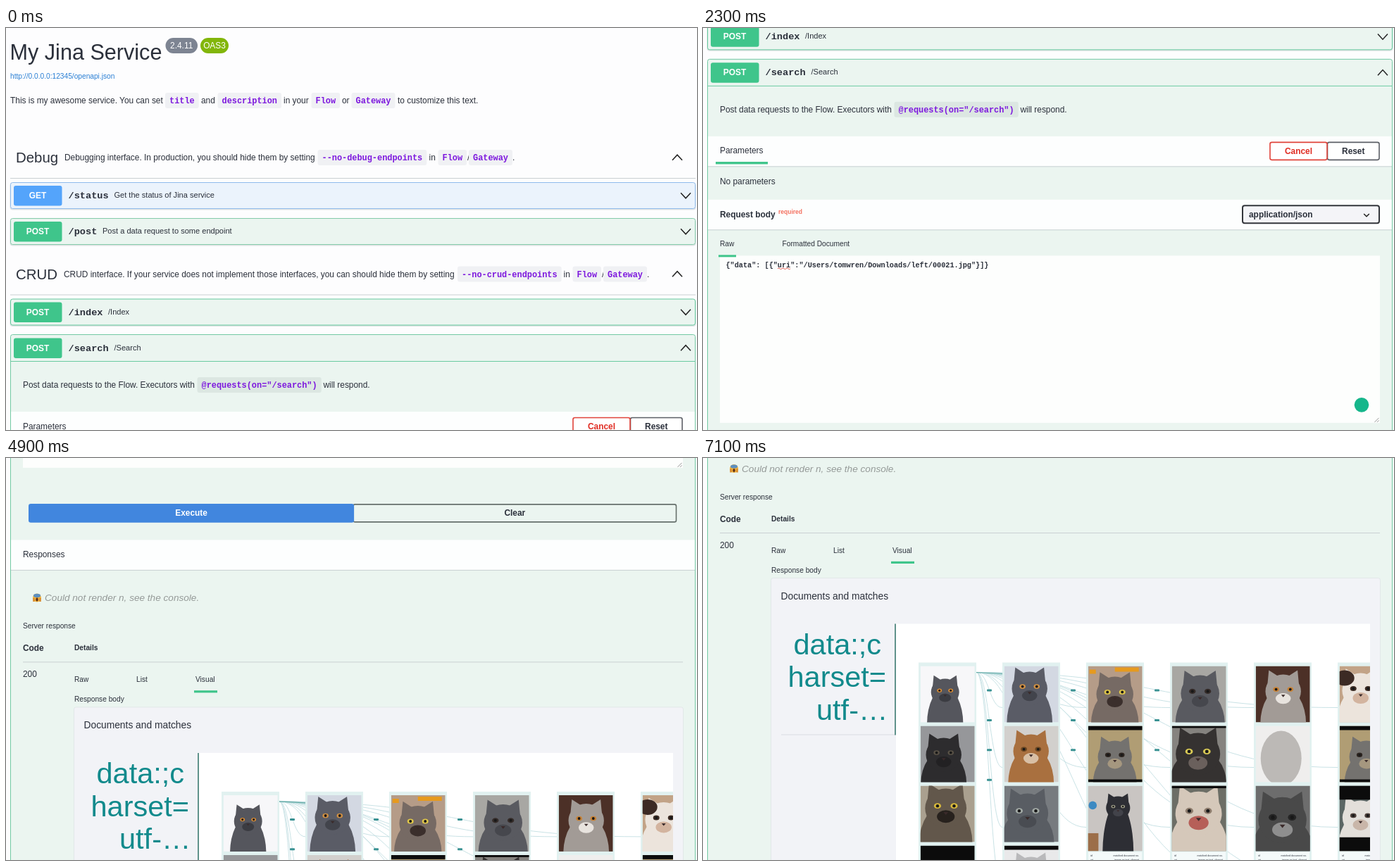
Write an HTML page that moves like this. It is 981x571 px and loops after 7200 ms.

```html
<!DOCTYPE html>
<html lang="en">
<head>
<meta charset="utf-8">
<title>API docs scroll</title>
<style>
  html, body { margin: 0; width: 100%; height: 100%; overflow: hidden; background: #fdfdfe; }
  svg { display: block; }
  #stage { width: 100%; height: 100%; }
  text { font-family: "Liberation Sans", Arial, sans-serif; fill: #2b303b; }
  .b { font-weight: bold; }
  .m { font-family: "Liberation Mono", monospace; font-weight: bold; }
  .c { text-anchor: middle; }
  .e { text-anchor: end; }
  .code { fill: #7d18de; }
  .w { fill: #fff; }
  .link { fill: #2a7fd4; }
  .cancel { fill: #e02c22; }
  .required { fill: #f4705f; }
  .notice { fill: #959a98; font-style: italic; }
  .big { fill: #128a8c; }
</style>
</head>
<body>
<svg id="stage" viewBox="0 0 981 571"><g id="page"></g></svg>
<script>
const GREEN = '#3fc58b', LINE = '#c9d0d2', MINT = '#ebf5f0';
const out = [];
const add = markup => out.push(markup);

const text = (x, y, str, size = 11.9, cls = '') =>
  add(`<text x="${x}" y="${y}" font-size="${size}" class="${cls}">${str}</text>`);
const rect = (x, y, w, h, fill, attrs = '') =>
  add(`<rect x="${x}" y="${y}" width="${w}" height="${h}" fill="${fill}" ${attrs}/>`);
const path = (d, stroke, width = 1) =>
  add(`<path d="${d}" fill="none" stroke="${stroke}" stroke-width="${width}"/>`);
const hline = (x1, x2, y, color = LINE) => path(`M${x1} ${y}H${x2}`, color);
const chevron = (x, y, dy, half = 7) =>
  path(`M${x - half} ${y - dy}L${x} ${y + dy}L${x + half} ${y - dy}`, '#222', 1.5);

function code(x, y, str, fill = '#f0f1f4') {
  rect(x, y - 15, str.length * 7.14 + 12, 22, fill, 'rx="3"');
  text(x + 6, y, str, 11.9, 'm code');
}

function section(y, name, descX, desc, flag, flagX, tailX) {
  text(14, y + 7, name, 20.4);
  text(descX, y + 4, desc);
  code(flagX, y + 4, flag);
  text(tailX, y + 4, 'in');
  code(tailX + 13, y + 4, 'Flow');
  text(tailX + 54.5, y + 4, '/');
  code(tailX + 56.5, y + 4, 'Gateway');
  text(tailX + 118.5, y + 4, '.');
  chevron(953, y, -3.8);
  hline(6, 979, y + 29.5);
}

function operation(y, method, route, descX, desc, color, fill, border) {
  if (fill) {
    rect(6.5, y + 1.5, 972, 37, 'none', 'rx="3" stroke="#dfe3e4" stroke-width="2"');
    rect(6.5, y + .5, 972, 37, fill, `rx="3" stroke="${border}"`);
  }
  rect(11, y + 5, 68.5, 28.5, color, 'rx="3"');
  text(45, y + 23, method, 11.9, 'b w c');
  text(88.5, y + 23, route, 13.6, 'm');
  text(descX, y + 22, desc, 11.05);
  chevron(965, y + 19, fill ? 3.8 : -3.8);
}

function band(y) {
  rect(7, y, 971, 42.5, '#fdfefe');
  hline(7, 978, y + 43);
}

function button(x, y, w, label, fill, stroke, cls = '') {
  rect(x, y, w, 25, fill, `rx="2.5" stroke="${stroke}" stroke-width="1.6"`);
  text(x + w / 2, y + 16.6, label, 11.9, 'b c ' + cls);
}

// Header
text(5.5, 45, 'My Jina Service', 30.6);
rect(226.5, 14, 45.5, 22, '#7d8492', 'rx="11"');
text(249.2, 29, '2.4.11', 11.9, 'w c');
rect(276, 14, 40, 22, '#82b60a', 'rx="11"');
text(296, 29, 'OAS3', 11.9, 'w c');
text(6, 72, 'http://0.0.0.0:12345/openapi.json', 10.2, 'link');
text(6, 107, 'This is my awesome service. You can set');
code(226, 107, 'title');
text(277, 107, 'and');
code(300.5, 107, 'description');
text(394, 107, 'in your');
code(433.5, 107, 'Flow');
text(477, 107, 'or');
code(490.5, 107, 'Gateway');
text(556, 107, 'to customize this text.');

// Operations
section(184, 'Debug', 83, 'Debugging interface. In production, you should hide them by setting',
  '--no-debug-endpoints', 442.5, 600.5);
operation(219, 'GET', '/status', 153.5, 'Get the status of Jina service', '#54a4fb', '#ebf3fc', '#8fbbec');
operation(270, 'POST', '/post', 137, 'Post a data request to some endpoint', GREEN, MINT, '#83cbaa');
section(349.5, 'CRUD', 82, 'CRUD interface. If your service does not implement those interfaces, you can should hide them by setting',
  '--no-crud-endpoints', 641, 791.5);
operation(384.5, 'POST', '/index', 145, '/Index', GREEN, MINT, '#62c99c');
rect(6.5, 435.5, 972, 1500, MINT, 'rx="3" stroke="#72c9a3"');
operation(435.5, 'POST', '/search', 153.5, '/Search', GREEN);
hline(7, 978, 473.5, '#6acba1');

// Request
text(24, 511, 'Post data requests to the Flow. Executors with');
code(271.5, 511, '@requests(on="/search")', '#dce7e2');
text(450.5, 511, 'will respond.');
band(545);
text(24, 569.5, 'Parameters');
rect(18, 581.2, 74, 3.4, GREEN);
button(886.5, 553.5, 73.5, 'Reset', '#fff', '#5c5f66');
button(805, 553.5, 81, 'Cancel', '#fff', '#e0433a', 'cancel');
text(24, 613, 'No parameters');
band(635);
text(24, 660, 'Request body', 11.9, 'b');
text(107, 655, 'required', 8.5, 'b required');
rect(766, 643.5, 194, 25, '#f4f4f8', 'rx="3" stroke="#34363c" stroke-width="2"');
text(775, 660, 'application/json', 11.9, 'b');
chevron(942, 657, 1.9, 3.8);
text(24, 701, 'Raw', 10.2);
text(112.5, 701, 'Formatted Document', 10.2);
rect(24, 714.5, 937, 237.5, '#fdfefd');
rect(22, 713.5, 25, 3, GREEN);
text(32.5, 731.3, '{"data": [{"uri":"/Users/tomwren/Downloads/left/00021.jpg"}]}', 10.2, 'm');
path('M106 733' + 'q1.5 -1.6 3 0t3 0'.repeat(3), '#e05a50');
add('<circle cx="935" cy="926.5" r="10.3" fill="#16b68b"/>');
path('M953.5 951L959.5 945M957 951L959.5 948.5', '#888', .9);
button(493, 1004, 458.5, 'Clear', MINT, '#66706c');
button(32.8, 1004, 460.5, 'Execute', '#4186de', '#4186de', 'w');

// Response
band(1054.5);
text(24, 1079, 'Responses');
add(`<circle cx="44" cy="1136.5" r="6" fill="#f0b23c"/>
  <ellipse cx="44" cy="1133.5" rx="5" ry="2.6" fill="#5c8fc0"/>
  <ellipse cx="44" cy="1139" rx="1.7" ry="2.6" fill="#5a2f1c"/>`);
path('M39.5 1137v5M48.5 1137v5', '#d9892b', 2.5);
text(55, 1141.5, 'Could not render n, see the console.', 13.6, 'notice');
text(24, 1180.5, 'Server response', 10.2);
text(24, 1212, 'Code', 11.9, 'b');
text(97, 1211.3, 'Details', 10.2, 'b');
hline(24, 961, 1228);
text(24, 1249.5, '200');
text(97, 1256.3, 'Raw', 10.2);
text(185, 1256.3, 'List', 10.2);
text(269, 1256.3, 'Visual', 10.2);
rect(267, 1268.3, 33, 3.2, GREEN);
text(97, 1284.5, 'Response body', 10.2);
rect(96.5, 1292, 865, 700, '#f2f3f7', 'rx="3" stroke="#e2e8e8"');
text(110.5, 1322.5, 'Documents and matches', 13.8);
text(128.5, 1400, 'data:;c', 41.5, 'big');
text(120.5, 1446.7, 'harset=', 41.5, 'big');
text(161, 1493.4, 'utf-…', 41.5, 'big');
hline(111, 273, 1514.5, '#d9dce2');
rect(274, 1357, 673, 600, '#fff');
path('M273 1357V1515', '#3c7a70', 1.6);

// Photo wall: each picture is a simple cat in the main tones
function cat(bg, fur, patch, eye, cx, cy, r, extra = '') {
  const side = s => `<path d="M${cx + s * r * .95} ${cy - r * .2}L${cx + s * r * .85} ${cy - r * 1.25}L${cx + s * r * .15} ${cy - r * .8}" fill="${fur}"/>`;
  const eyeball = s => `<ellipse cx="${cx + s * r * .42}" cy="${cy - r * .12}" rx="${r * .18}" ry="${r * .14}" fill="${eye}"/>
    <circle cx="${cx + s * r * .42}" cy="${cy - r * .12}" r="${r * .08}" fill="#181818"/>`;
  return `<rect width="77" height="80" fill="${bg}"/>
    <ellipse cx="${cx}" cy="82" rx="${r * 1.35}" ry="${88 - cy}" fill="${fur}"/>
    ${side(-1)}${side(1)}<ellipse cx="${cx}" cy="${cy}" rx="${r * 1.05}" ry="${r}" fill="${fur}"/>
    <ellipse cx="${cx}" cy="${cy + r * .42}" rx="${r * .45}" ry="${r * .32}" fill="${patch}"/>
    <path d="M${cx - r * .12} ${cy + r * .2}h${r * .24}l${-r * .12} ${r * .14}z" fill="#3a2a2a"/>
    ${eyeball(-1)}${eyeball(1)}${extra}`;
}
const bar = (y, h) => `<rect y="${y}" width="77" height="${h}" fill="#0c0c0c"/>`;
const rabbit = cat('#b09d74', '#74726f', '#a5977f', '#2d2520', 38, 44, 23, bar(0, 6) + bar(76, 4));
const sketch = '<rect width="77" height="80" fill="#efeeed"/><ellipse cx="36" cy="46" rx="29" ry="39" fill="#bcb9b6"/>';
const photos = [
  [
    cat('#f7f7f9', '#55565d', '#3b3c42', '#d58a35', 35, 37, 19),
    cat('#d3d8e2', '#5a5c66', '#42444c', '#cf8f43', 36, 32, 24),
    cat('#b59c88', '#766a64', '#3b2f2c', '#e0c749', 38, 40, 25,
      '<path d="M2 8h9M38 5h34" stroke="#e69a1e" stroke-width="6"/>'),
    cat('#a8a7a3', '#595a60', '#46474d', '#352c29', 40, 39, 26),
    cat('#4c3027', '#a29b96', '#e8e3de', '#c98234', 39, 36, 24),
    cat('#c2a387', '#ece4dc', '#d3b49f', '#3b2a22', 30, 35, 25,
      '<ellipse cx="7" cy="17" rx="14" ry="11" fill="#3c2a24"/>')
  ], [
    cat('#96979a', '#2d2c2e', '#222123', '#575045', 33, 41, 24),
    cat('#d2d0cd', '#a9703f', '#d8bfa5', '#6b4722', 38, 36, 24),
    rabbit,
    cat('#85837f', '#353231', '#6a605c', '#d7c855', 37, 40, 30, bar(0, 3)),
    sketch,
    rabbit
  ], [
    cat('#aaa08f', '#62574b', '#27211d', '#d8b93c', 36, 32, 28),
    cat('#777b7f', '#595d63', '#494c52', '#a2a9a5', 33, 39, 28),
    cat('#c9c5c2', '#2d2e34', '#42434a', '#9b9a86', 42, 27, 14,
      '<rect y="58" width="18" height="22" fill="#9c6e49"/><circle cx="11" cy="24" r="5" fill="#3d8ac2"/>'),
    cat('#6c6e66', '#d5c8ba', '#b65f58', '#8d7c6d', 38, 34, 27, bar(0, 3)),
    cat('#6d6d6d', '#494949', '#8e8e8e', '#242424', 38, 42, 28),
    cat('#5b6664', '#e3dfda', '#c9b6a9', '#4c3f3a', 31, 39, 21, bar(0, 17) + bar(63, 17))
  ], [
    bar(0, 80),
    cat('#e9e9ea', '#b9b9bb', '#888', '#555', 38, 40, 24, bar(0, 6))
  ]
];
const WALL_TOP = 1412;
const columnX = col => 306 + 119 * col;

add('<clipPath id="wall"><rect x="274" y="1357" width="673" height="600"/></clipPath><g clip-path="url(#wall)">');
for (let col = 1; col < 6; col++) {
  const x = columnX(col), mid = (388 + x) / 2;
  for (let row = 0; row < 4; row++) {
    const y = WALL_TOP + 64 + 85 * row;
    path(`M388 1426C${mid} 1426 ${mid} ${y} ${x} ${y}`, '#c3dfe2', .9);
  }
}
path('M388 1426L425 1428', '#5fa9a3', 1.1);
for (let col = 0; col < 3; col++)
  for (let row = 0; row < (col ? 3 : 4); row++)
    rect(columnX(col) + 97, 1450 + 42.4 * row, 7, 3, '#3a9293', 'rx="1"');
for (let col = 0; col < 6; col++) {
  const x = columnX(col);
  rect(x, WALL_TOP, 82, 500, '#e1f1f0');
  photos.forEach((row, i) => {
    if (!row[col]) return;
    const height = i === 2 && col > 1 ? 93 : 80;
    add(`<svg x="${x + 2.7}" y="${WALL_TOP + 5 + 85 * i}" width="77" height="${height}"
      viewBox="0 0 77 80" preserveAspectRatio="xMidYMid slice">${row[col]}</svg>`);
  });
  if (col > 1) {
    rect(x + 3, WALL_TOP + 269, 76, 40, '#f4fafa');
    [['id', 'matched document no.'], ['uri', 'image as text, charset']].forEach(([key, value], i) => {
      text(x + 6, WALL_TOP + 275 + 6 * i, key, 3.6);
      text(x + 75, WALL_TOP + 275 + 6 * i, value, 3.6, 'e');
    });
  }
}
add('</g>');

const page = document.getElementById('page');
page.innerHTML = out.join('');

// Scroll position over time: [ms, px]
const LOOP = 7200, STEP = 100;
const scrollKeys = [[0, 0], [800, 0], [1600, 255], [2600, 449.5], [3200, 449.5], [4000, 708],
  [4300, 708], [4400, 739.5], [5300, 1097], [5600, 1121.5], [LOOP, 1121.5]];

function scrollAt(t) {
  const i = scrollKeys.findIndex(([time]) => time > t);
  const [t0, y0] = scrollKeys[i - 1], [t1, y1] = scrollKeys[i];
  return y0 + (y1 - y0) * (t - t0) / (t1 - t0);
}

function draw(now) {
  const t = Math.floor(now % LOOP / STEP) * STEP;
  page.setAttribute('transform', `translate(0 ${-scrollAt(t)})`);
  requestAnimationFrame(draw);
}
requestAnimationFrame(draw);
</script>
</body>
</html>
```
